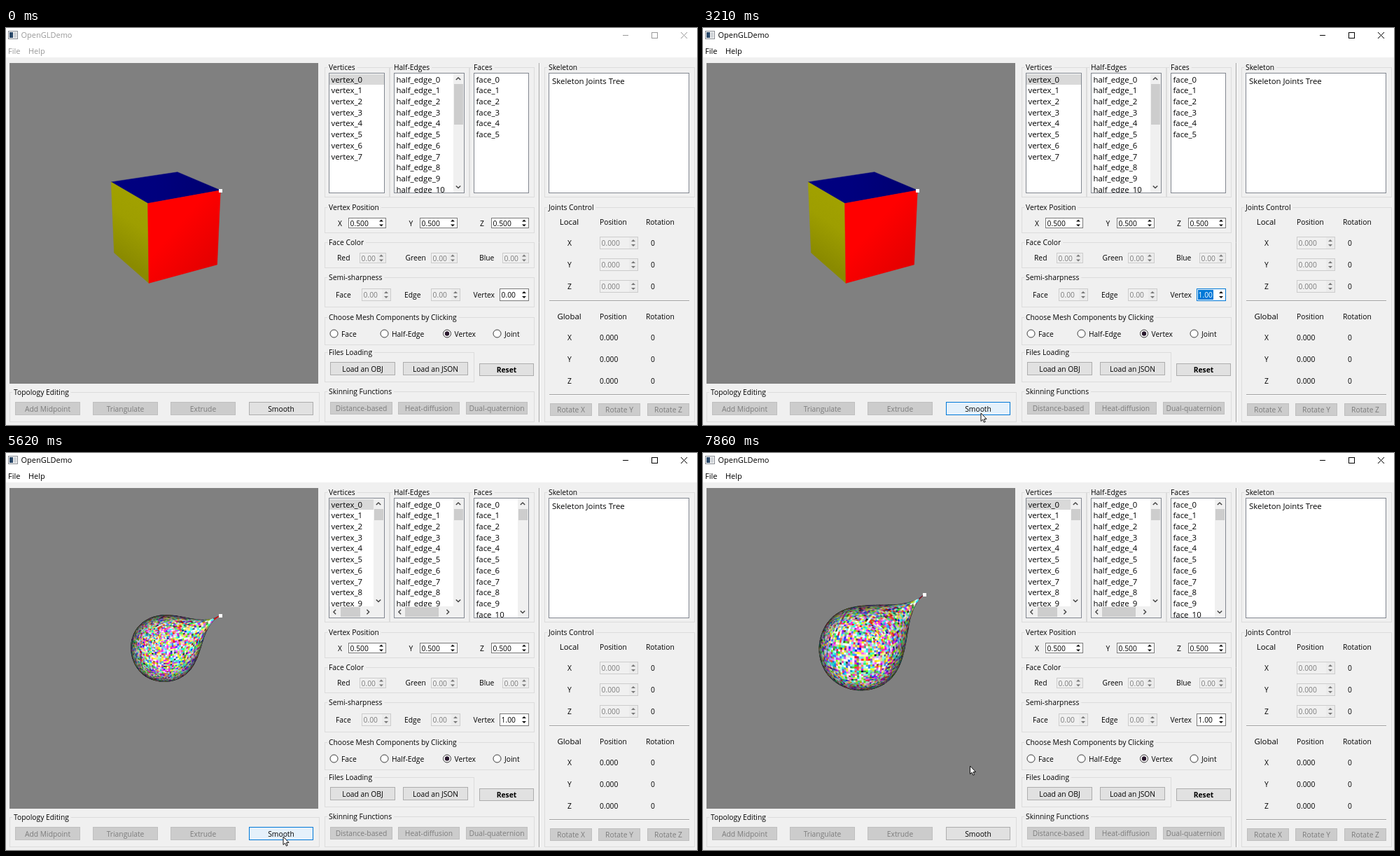
Recreate the animation shown at these times as an HTML page with a canvas. Size 987 by 567 pixels, loop 8000 ms.

```html
<!DOCTYPE html>
<html lang="en">
<head>
<meta charset="utf-8">
<title>OpenGLDemo</title>
<style>
  html, body { margin: 0; width: 100%; height: 100%; overflow: hidden; background: #f0f0f0; }
  canvas { display: block; }
</style>
</head>
<body>
<canvas id="stage" width="987" height="567"></canvas>
<script>
const ctx = document.getElementById('stage').getContext('2d');
const LOOP = 8000;
const SMALL = 10.3, MENU = 11, LARGE = 11.4;
const INK = '#000', FAINT = '#7c7c7c', BLUE = '#0078d7';

// Each step overrides the state that came before it.
const steps = [
  { t: 0, level: 0, distance: 6, azimuth: 30, value: '0.00', cursor: null, pointer: 'arrow' },
  { t: 190, cursor: [604, 487] },
  { t: 400, cursor: [640, 455] },
  { t: 610, cursor: [690, 410] },
  { t: 830, cursor: [732, 381], pointer: 'beam' },
  { t: 1040, titleActive: true, focus: '#171717', glow: true },
  { t: 1270, cursor: [663, 381], menuActive: true, selected: true },
  { t: 1500, cursor: [663, 380], pointer: 'arrow', glow: false, focus: BLUE },
  { t: 1710, value: '1', selected: false },
  { t: 1920, value: '1.00' },
  { t: 2130, selected: true },
  { t: 2780, cursor: [600, 420] },
  { t: 3000, cursor: [460, 515] },
  { t: 3210, cursor: [397, 550], button: 'hover' },
  { t: 3440, cursor: [396, 548], button: 'down', focus: null, selected: false },
  { t: 3680, button: 'hover', level: 1 },
  { t: 3880, button: 'down' },
  { t: 4090, button: 'hover', level: 2 },
  { t: 4310, level: 3 },
  { t: 4740, button: 'down' },
  { t: 5190, button: 'hover', level: 4 },
  { t: 5620, level: 5 },
  { t: 5860, cursor: [391, 510], button: null, distance: 5.6 },
  { t: 6090, cursor: [384, 465], distance: 5.18 },
  { t: 6330, cursor: [381.5, 447], distance: 4.76 },
  { t: 6770, azimuth: 36 },
  { t: 6980, azimuth: 42 },
  { t: 7190, azimuth: 47.5 },
  { t: 7440, azimuth: 54 },
  { t: 7650, azimuth: 60.5 },
  { t: 7860, azimuth: 67 }
];
const states = [];
steps.forEach((step, i) => states.push({ ...states[i - 1], ...step }));

// ---------- mesh ----------
let seed = 7;
function random() {
  seed = (seed + 0x6D2B79F5) | 0;
  let r = Math.imul(seed ^ (seed >>> 15), 1 | seed);
  r = (r + Math.imul(r ^ (r >>> 7), 61 | r)) ^ r;
  return ((r ^ (r >>> 14)) >>> 0) / 4294967296;
}
const randomColor = () => [0, 1, 2].map(() => Math.min(1, random() * 1.5));
const dot = (a, b) => a[0] * b[0] + a[1] * b[1] + a[2] * b[2];
const sub = (a, b) => a.map((v, i) => v - b[i]);
const average = points => [0, 1, 2].map(k => points.reduce((sum, p) => sum + p[k], 0) / points.length);
const cross = (a, b) => [a[1] * b[2] - a[2] * b[1], a[2] * b[0] - a[0] * b[2], a[0] * b[1] - a[1] * b[0]];

function makeCube() {
  const h = 0.5;
  const face = (ids, color) => ({ ids, color });
  return {
    verts: [[h, h, h], [-h, h, h], [-h, -h, h], [h, -h, h], [h, h, -h], [-h, h, -h], [-h, -h, -h], [h, -h, -h]],
    faces: [
      face([0, 1, 2, 3], [1, 0, 0]), face([2, 1, 5, 6], [1, 1, 0]), face([4, 5, 1, 0], [0, 0, 1]),
      face([3, 2, 6, 7], [0, 1, 1]), face([3, 7, 4, 0], [1, 0, 1]), face([4, 7, 6, 5], [0, 1, 0])
    ]
  };
}

// Catmull-Clark step that keeps the sharp vertex 0 in place.
function subdivide({ verts, faces }) {
  const edges = new Map();
  const around = verts.map(() => ({ centers: [], middles: [] }));
  const edgeKey = (a, b) => Math.min(a, b) * 65536 + Math.max(a, b);
  const centers = faces.map(({ ids }) => average(ids.map(id => verts[id])));
  faces.forEach(({ ids }, f) => ids.forEach((a, i) => {
    const b = ids[(i + 1) % 4], key = edgeKey(a, b);
    around[a].centers.push(centers[f]);
    if (!edges.has(key)) {
      edges.set(key, { ends: [verts[a], verts[b]], centers: [] });
      const middle = average([verts[a], verts[b]]);
      around[a].middles.push(middle);
      around[b].middles.push(middle);
    }
    edges.get(key).centers.push(centers[f]);
  }));
  const next = verts.map((p, id) => {
    if (id === 0) return p;
    const n = around[id].centers.length;
    const F = average(around[id].centers), R = average(around[id].middles);
    return p.map((v, k) => (F[k] + 2 * R[k] + (n - 3) * v) / n);
  });
  for (const edge of edges.values()) {
    edge.id = next.push(average([...edge.ends, ...edge.centers])) - 1;
  }
  const quads = [];
  faces.forEach(({ ids, color }, f) => {
    const center = next.push(centers[f]) - 1;
    ids.forEach((a, i) => quads.push({
      ids: [a, edges.get(edgeKey(a, ids[(i + 1) % 4])).id, center, edges.get(edgeKey(a, ids[(i + 3) % 4])).id],
      color: i ? randomColor() : color
    }));
  });
  return { verts: next, faces: quads };
}
const meshes = [makeCube()];
while (meshes.length < 6) meshes.push(subdivide(meshes[meshes.length - 1]));

function drawMesh({ level, distance, azimuth }) {
  const { verts, faces } = meshes[level];
  const a = azimuth * Math.PI / 180, e = 21 * Math.PI / 180;
  const c = Math.cos(a), s = Math.sin(a), ce = Math.cos(e), se = Math.sin(e);
  const toEye = [-s * ce, se, c * ce], right = [c, 0, s], up = [s * se, ce, -c * se];
  const eye = toEye.map(v => v * distance);
  const screen = verts.map(p => {
    const scale = 665 / (distance - dot(p, toEye));
    return [226 + dot(p, right) * scale, 279 - dot(p, up) * scale];
  });
  const tint = (color, light) => `rgb(${color.map(v => Math.min(255, Math.round(v * light * 255)))})`;
  const visible = [];
  for (const { ids, color } of faces) {
    const p = ids.map(id => verts[id]);
    const normal = cross(sub(p[2], p[0]), sub(p[3], p[1]));
    if (dot(normal, sub(eye, p[0])) <= 0) continue;
    const facing = Math.max(0, dot(normal, toEye) / Math.hypot(...normal));
    visible.push({ ids, color, light: 0.085 + 1.17 * facing, depth: dot(average(p), toEye) });
  }
  visible.sort((m, n) => m.depth - n.depth);
  ctx.lineWidth = 0.5;
  for (const { ids, color, light } of visible) {
    const q = ids.map(id => screen[id]);
    let paint = tint(color, light);
    if (level === 0) {
      paint = ctx.createLinearGradient(...q[1], ...q[3]);
      paint.addColorStop(0, tint(color, light));
      paint.addColorStop(0.4, tint(color, light * 0.98));
      paint.addColorStop(1, tint(color, light * 0.86));
    }
    polygon(q, paint, paint);
  }
  const [x, y] = screen[0];
  box(Math.round(x) - 2, Math.round(y) - 2, 5, 5, '#fff');
}

// ---------- drawing helpers ----------
function box(x, y, w, h, fill, stroke) {
  if (fill) { ctx.fillStyle = fill; ctx.fillRect(x, y, w, h); }
  if (stroke) { ctx.strokeStyle = stroke; ctx.lineWidth = 1; ctx.strokeRect(x + 0.5, y + 0.5, w - 1, h - 1); }
}
function polygon(points, fill, stroke) {
  ctx.beginPath();
  points.forEach(p => ctx.lineTo(...p));
  ctx.closePath();
  if (fill) { ctx.fillStyle = fill; ctx.fill(); }
  if (stroke) { ctx.strokeStyle = stroke; ctx.stroke(); }
}
function line(points, color, width = 1) {
  ctx.beginPath();
  points.forEach(p => ctx.lineTo(...p));
  ctx.strokeStyle = color;
  ctx.lineWidth = width;
  ctx.stroke();
}
function disc(x, y, r, fill, stroke) {
  ctx.beginPath();
  ctx.arc(x, y, r, 0, 7);
  if (fill) { ctx.fillStyle = fill; ctx.fill(); }
  if (stroke) { ctx.strokeStyle = stroke; ctx.lineWidth = 1; ctx.stroke(); }
}
function setFont(size, weight = 400) {
  ctx.font = `${weight} ${size}px "Open Sans", "Noto Sans", sans-serif`;
}
// y is the middle of the capital letters.
function text(str, x, y, { size = SMALL, color = INK, align = 'left', weight } = {}) {
  setFont(size, weight);
  ctx.textAlign = align;
  ctx.fillStyle = color;
  ctx.fillText(str, x, y + size * 0.36);
}
function group(title, x, y, right, bottom) {
  box(x, y, right - x, bottom - y, null, '#dcdcdc');
  setFont(SMALL);
  box(x + 4, y - 1, ctx.measureText(title).width + 5, 3, '#f0f0f0');
  text(title, x + 6, y + 0.5);
}
function button(label, x, y, w, h, { enabled = true, state, weight } = {}) {
  const [fill, edge] = !enabled ? ['#ccc', '#bfbfbf']
    : state === 'hover' ? ['#e5f1fb', BLUE]
    : state === 'down' ? ['#cce4f7', '#005499'] : ['#e1e1e1', '#adadad'];
  box(x, y, w, h, fill, edge);
  text(label, x + w / 2, y + h / 2 + 0.5, { align: 'center', color: enabled ? INK : FAINT, weight });
}
function spin(value, x, y, w, h, { enabled = true, selected, border } = {}) {
  const middle = y + h / 2, ax = x + w - 7, ink = enabled ? '#111' : '#777';
  box(x, y, w, h, enabled ? '#fff' : '#f0f0f0', border || (enabled ? '#7a7a7a' : '#ccc'));
  if (!enabled) box(x + w - 13, y + 1, 12, h - 2, '#ebebeb');
  if (selected) box(x + 2, y + 2, 22, h - 4, BLUE);
  text(value, x + 2.5, middle + 0.5, { color: selected ? '#fff' : enabled ? INK : FAINT });
  polygon([[ax - 3, middle - 2], [ax, middle - 5], [ax + 3, middle - 2]], ink);
  polygon([[ax - 3, middle + 2], [ax, middle + 5], [ax + 3, middle + 2]], ink);
}
function radio(label, x, checked) {
  disc(x, 436.5, 5.5, '#fff', '#333');
  if (checked) disc(x, 436.5, 3.2, '#2a1a2e');
  text(label, x + 10.5, 437);
}
function chevron(x, y, dx, dy) {
  const w = Math.abs(dy) * 3.2, h = Math.abs(dx) * 3.2;
  line([[x - w - 1.6 * dx, y - h - 1.6 * dy], [x + 1.6 * dx, y + 1.6 * dy], [x + w - 1.6 * dx, y + h - 1.6 * dy]], '#444', 1.4);
}
function list(x, w, prefix, count, { highlight, thumb } = {}) {
  const scrolls = count > 10, innerRight = x + w - (scrolls ? 16 : 1), bottom = thumb ? 219 : 235;
  box(x, 64, w, 172, '#fff', '#828790');
  ctx.save();
  ctx.beginPath();
  ctx.rect(x + 1, 65, innerRight - x - 1, bottom - 65);
  ctx.clip();
  if (highlight) box(x + 1, 66, w, 15, '#d9d9d9');
  for (let i = 0; i < Math.min(count, 11); i++) {
    text(`${prefix}_${i}`, x + 3.5, 73.5 + 15.7 * i, { size: LARGE });
  }
  ctx.restore();
  if (scrolls) {
    box(innerRight, 65, 15, 170, '#f0f0f0');
    box(innerRight + 1, 80, 13, Math.max(16, Math.round(1390 / count)), '#cdcdcd');
    chevron(innerRight + 7, 72.5, 0, -1);
    chevron(innerRight + 7, bottom - 8, 0, 1);
  }
  if (thumb) {
    box(x + 1, 219, innerRight - x - 1, 16, '#f0f0f0');
    box(thumb[0], 220, thumb[1], 14, '#cdcdcd');
    chevron(x + 8.5, 227, -1, 0);
    chevron(innerRight - 8, 227, 1, 0);
  }
}

// ---------- window parts ----------
function drawTitleBar({ titleActive, menuActive }) {
  const ink = titleActive ? '#000' : '#999';
  box(0, 0, 987, 42, '#fff');
  box(3, 4, 14, 12, '#f4f4f4', '#8a8f96');
  box(5, 6, 5, 8, '#2c4a6a');
  box(11, 6, 4, 8, '#d0d4d8');
  text('OpenGLDemo', 21.5, 10.5, { size: MENU, color: ink });
  line([[881, 10.5], [889, 10.5]], ink);
  box(922, 6, 9, 9, null, ink);
  line([[964, 6], [973, 15]], ink);
  line([[973, 6], [964, 15]], ink);
  const menu = { size: MENU, color: menuActive ? '#000' : '#999' };
  text('File', 3, 33.5, menu);
  text('Help', 32, 33.5, menu);
}

function drawLists({ level }) {
  const { verts, faces } = meshes[level];
  group('Vertices', 455, 56, 548, 242);
  group('Half-Edges', 548, 56, 662, 242);
  group('Faces', 662, 56, 755, 242);
  list(461, 80, 'vertex', verts.length, { highlight: true, thumb: level > 3 && [478, 28] });
  list(554, 101, 'half_edge', faces.length * 4, { thumb: level > 2 && (level > 4 ? [570, 48] : [571, 50]) });
  list(668, 79, 'face', faces.length);
  group('Skeleton', 769, 56, 984, 242);
  box(775, 64, 201, 172, '#fff', '#828790');
  text('Skeleton Joints Tree', 780, 75.5, { size: LARGE });
}

function drawProperties({ value, selected, focus }) {
  const off = { enabled: false };
  group('Vertex Position', 455, 256, 755, 293);
  ['X', 'Y', 'Z'].forEach((axis, i) => {
    text(axis, 477 + 101.5 * i, 279, { align: 'center' });
    spin('0.500', 489 + 102 * i, 271, 54, 15, {});
  });
  group('Face Color', 455, 306, 755, 343);
  [['Red', 473], ['Green', 570.5], ['Blue', 676]].forEach(([name, x], i) => {
    text(name, x, 328.5);
    spin('0.00', 505 + 102 * i, 321, 38, 15, off);
  });
  group('Semi-sharpness', 455, 356, 755, 399);
  text('Face', 471, 381);
  spin('0.00', 508, 372, 42, 18, off);
  text('Edge', 569, 381);
  spin('0.00', 607, 372, 42, 18, off);
  text('Vertex', 667.5, 381);
  spin(value, 705, 372, 42, 18, { selected, border: focus });
  group('Choose Mesh Components by Clicking', 455, 413, 755, 453);
  radio('Face', 468.5);
  radio('Half-Edge', 540.5);
  radio('Vertex', 630, true);
  radio('Joint', 701.5);
}

function drawButtons(state) {
  const off = { enabled: false };
  group('Files Loading', 455, 463, 669, 506);
  button('Load an OBJ', 463, 477, 93, 19);
  button('Load an JSON', 567, 477, 93, 19);
  button('Reset', 676, 479, 78, 18, { weight: 700 });
  group('Skinning Functions', 455, 519, 755, 563);
  button('Distance-based', 463, 534, 89, 18, off);
  button('Heat-diffusion', 560, 534, 88, 18, off);
  button('Dual-quaternion', 657, 534, 88, 18, off);
  group('Topology Editing', 5, 520, 448, 563);
  ['Add Midpoint', 'Triangulate', 'Extrude'].forEach((label, i) => button(label, 13 + 111 * i, 534, 93, 19, off));
  button('Smooth', 347, 534, 92, 19, { state: state.button });
}

function drawJoints() {
  line([[761.5, 50], [761.5, 563]], '#a0a0a0');
  line([[762.5, 50], [762.5, 563]], '#fff');
  group('Joints Control', 769, 256, 984, 563);
  [['Local', 276.5, 307], ['Global', 411.5, 442]].forEach(([name, top, first], section) => {
    text(name, 804.5, top, { size: LARGE, align: 'center' });
    text('Position', 848, top + 0.5);
    text('Rotation', 914, top + 0.5);
    ['X', 'Y', 'Z'].forEach((axis, i) => {
      const y = first + 31 * i;
      text(axis, 805, y + 0.5, { align: 'center' });
      if (section) text('0.000', 848, y + 0.5);
      else spin('0.000', 848, y - 9, 55, 18, { enabled: false });
      text('0', 921, y + 0.5);
    });
  });
  for (const y of [389.5, 523.5]) {
    line([[776, y], [976, y]], '#a0a0a0');
    line([[776, y + 1], [976, y + 1]], '#fff');
  }
  ['X', 'Y', 'Z'].forEach((axis, i) => button('Rotate ' + axis, Math.round(777 + 69.3 * i), 536, 60, 18, { enabled: false }));
}

function drawCursor({ cursor, pointer, glow }) {
  if (!cursor) return;
  const [x, y] = cursor;
  if (glow) disc(x - 1, y - 1, 10.5, 'rgba(250, 240, 50, 0.75)');
  if (pointer === 'beam') {
    line([[x + 0.5, y - 6], [x + 0.5, y + 6]], '#444');
    line([[x - 2, y - 5.5], [x + 3, y - 5.5]], '#444');
    line([[x - 2, y + 5.5], [x + 3, y + 5.5]], '#444');
    return;
  }
  const shape = [[0, 0], [0, 11.5], [2.6, 9.2], [4.4, 13.2], [6.2, 12.4], [4.5, 8.6], [8, 8.4]];
  ctx.lineWidth = 1;
  polygon(shape.map(([px, py]) => [x + px, y + py]), '#fff', '#111');
}

function draw(state) {
  box(0, 0, 987, 567, '#f0f0f0');
  drawTitleBar(state);
  box(5, 50, 441, 458, '#808080');
  drawMesh(state);
  drawLists(state);
  drawProperties(state);
  drawButtons(state);
  drawJoints();
  drawCursor(state);
}

const start = performance.now();
let shown = null;
function tick() {
  const time = (performance.now() - start) % LOOP;
  const state = states.findLast(s => s.t <= time);
  if (state !== shown) draw(shown = state);
  requestAnimationFrame(tick);
}
tick();
</script>
</body>
</html>
```
